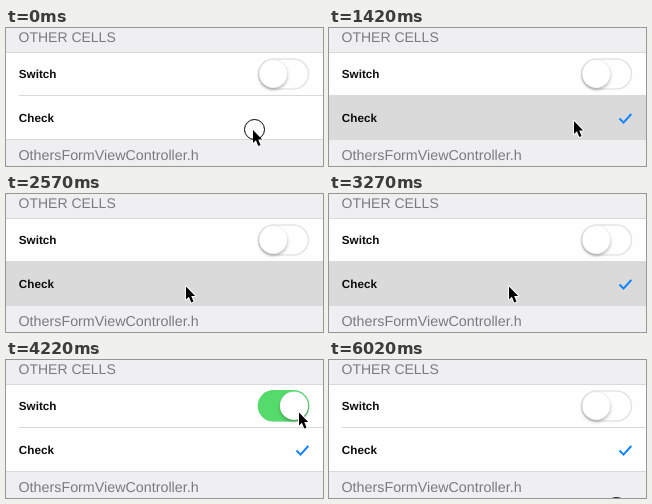
An HTML page for the animation above (6.05 s loop, 317 by 138 pixels).

```html
<!DOCTYPE html>
<html lang="en">
<head>
<meta charset="utf-8">
<title>Other cells</title>
<style>
  html, body { margin: 0; width: 100%; height: 100%; overflow: hidden; background: #efeff1; }
  svg { display: block; width: 317px; height: 138px; }
  text { font-family: "Liberation Sans", Arial, sans-serif; text-rendering: geometricPrecision; }
  .caption { font-size: 14px; fill: #7b7b7f; }
  .file { font-size: 14.3px; }
  .label { font-size: 11.7px; font-weight: bold; fill: #0c0c0c; }
  #knob { filter: drop-shadow(0 2px 1.5px rgba(0, 0, 0, .25)); }
</style>
</head>
<body>
<svg viewBox="0 0 317 138">
  <rect width="317" height="138" fill="#efeff1"/>
  <rect y="24" width="317" height="88" fill="#fefefe"/>
  <path d="M0 24.5H317M13 67.5H317M0 111.5H317" stroke="#d9d9db"/>
  <rect id="highlight" y="67" width="317" height="45" fill="#dadada"/>

  <text class="caption" x="12.5" y="14">OTHER CELLS</text>
  <text class="label" x="12.8" y="50.2">Switch</text>
  <text class="label" x="12.8" y="94.2">Check</text>
  <text class="caption file" x="12.5" y="132">OthersFormViewController.h</text>

  <rect x="252.5" y="31" width="50" height="30" rx="15" fill="#fefefe" stroke="#e5e5e5" stroke-width="1.5"/>
  <rect id="tint" x="251.7" y="30" width="51.6" height="31.6" rx="15.8" fill="#55db6c"/>
  <circle id="knob" cy="45.8" r="14.2" fill="#fff" stroke="#000" stroke-opacity=".1" stroke-width=".6"/>
  <path id="check" d="M290.5 90.5L294.5 94.6L302.3 86" fill="none" stroke="#0f84fd" stroke-width="2"/>

  <g id="pointer">
    <path d="M-1.5 .5V13.4L1.4 10.7L3.8 16.4L6 15.4L3.7 9.9H7.7Z" stroke="#fff" stroke-width="2" paint-order="stroke" stroke-linejoin="round"/>
    <circle id="ring" r="10" fill="none" stroke="#000"/>
  </g>
</svg>
<script>
const LOOP = 6050, TICK = 88, SLIDE = 170;
const $ = id => document.getElementById(id);

// Each move eases the pointer to (x, y); sway bows its path sideways.
const home = { x: 248.5, y: 101.5 };
const moves = [
  { start: 620, end: 870, x: 246.5, y: 92.5 },
  { start: 1500, end: 2200, x: 181.5, y: 92 },
  { start: 3260, end: 3950, x: 294.5, y: 52, sway: [25, 0] },
  { start: 4230, end: 4920, x: 278.5, y: 49.5, sway: [-44, 19] },
  { start: 5190, end: 5630, x: 287.5, y: 147.5, sway: [-45, 0] }
];
const taps = [
  { press: 1340, release: 1420, on: "check" },
  { press: 2390, release: 2570, on: "check" },
  { press: 3180, release: 3270, on: "check" },
  { press: 3970, release: 4050, on: "switch" },
  { press: 5030, release: 5120, on: "switch" },
  { press: 6020, release: LOOP + 80 }
];
const tapsOn = name => taps.filter(tap => tap.on === name);
const checkTaps = tapsOn("check"), switchTaps = tapsOn("switch");

const ramp = (t, from, to) => Math.min(1, Math.max(0, (t - from) / (to - from)));
const smooth = p => p * p * (3 - 2 * p);

function pointerAt(t) {
  let { x, y } = home;
  for (const move of moves) {
    const p = smooth(ramp(t, move.start, move.end));
    const [swayX, swayY] = move.sway || [0, 0];
    const bow = Math.sin(Math.PI * p);
    x += (move.x - x) * p + swayX * bow;
    y += (move.y - y) * p + swayY * bow;
  }
  return [x, y];
}

const isPressed = (tap, t) => (t - tap.press + LOOP) % LOOP < tap.release - tap.press;

function draw(t) {
  const stepped = Math.floor((t + 10) / TICK) * TICK;
  const checked = checkTaps.filter(tap => t >= tap.release).length % 2;
  const on = switchTaps.reduce((sum, { release }, i) =>
    sum + (i % 2 ? -1 : 1) * smooth(ramp(stepped, release, release + SLIDE)), 0);
  const lit = t < checkTaps[0].release ? 0 : 1 - ramp(stepped, 3300, 3690);

  $("pointer").setAttribute("transform", `translate(${pointerAt(stepped)})`);
  $("ring").setAttribute("opacity", +taps.some(tap => isPressed(tap, t)));
  $("check").setAttribute("opacity", checked);
  $("highlight").setAttribute("opacity", lit);
  $("tint").setAttribute("opacity", on);
  $("knob").setAttribute("cx", 267.3 + 20.7 * on);
}

const start = performance.now();
function frame() {
  draw((performance.now() - start) % LOOP);
  requestAnimationFrame(frame);
}
frame();
</script>
</body>
</html>
```
